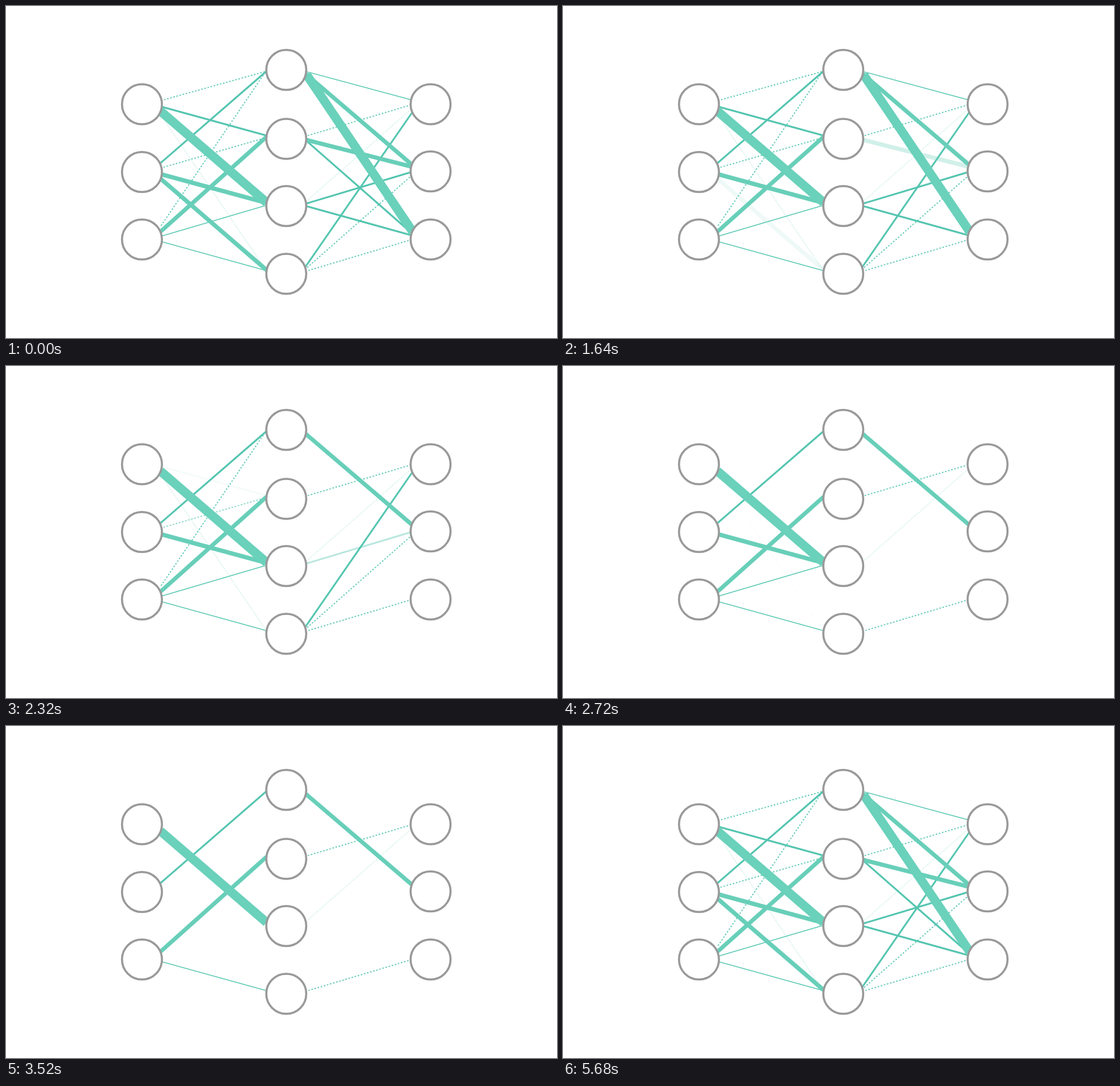
Write an HTML page that moves like this. It is 924x556 px and loops after 5720 ms.

```html
<!DOCTYPE html>
<html lang="en">
<head>
<meta charset="utf-8">
<title>Network pruning</title>
<style>
html, body { margin: 0; width: 100%; height: 100%; overflow: hidden; background: #fff; }
svg { display: block; width: 924px; height: 556px; }
circle { fill: #fff; stroke: #999; stroke-width: 3.5; }
.faint { stroke: #a5e3d5; stroke-width: 1; stroke-dasharray: 2 2; }
.dots { stroke: #5cc9b4; stroke-width: 1.8; stroke-dasharray: 2.6 2.8; }
.thin { stroke: #5cc9b4; stroke-width: 1.4; }
.mid { stroke: #54c5b0; stroke-width: 3; }
.bold { stroke: #68cfb9; stroke-width: 7; }
.heavy { stroke: #6ad1bb; stroke-width: 15; }
</style>
</head>
<body>
<svg id="stage" viewBox="0 0 924 556"></svg>
<script>
const LOOP = 5720, STEP = 40, FADE = 200;
const RETURN_START = 4800, RETURN_END = 5680;

// class, x1, y1, x2, y2, [fade start, fade length]; permanent links have no fade
const links = [
  ['faint', 262, 186, 435, 441, 2560],
  ['faint', 506, 325, 678, 174],
  ['dots', 265, 157, 434, 110, 1860],
  ['dots', 264, 270, 434, 221, 2270],
  ['dots', 260, 368, 434, 112, 2440],
  ['dots', 506, 217, 678, 166],
  ['dots', 505, 438, 679, 285, 2410],
  ['dots', 507, 443, 678, 392],
  ['thin', 262, 385, 436, 334, 3300],
  ['thin', 262, 395, 436, 443],
  ['thin', 504, 110, 679, 157, 2060],
  ['mid', 262, 169, 437, 217, 2130],
  ['mid', 258, 264, 437, 109],
  ['mid', 504, 226, 681, 381, 1440],
  ['mid', 503, 331, 680, 278, 2200],
  ['mid', 503, 335, 680, 384, 1700],
  ['mid', 502, 437, 682, 177, 2340],
  ['bold', 261, 282, 438, 330, 2800, 420],
  ['bold', 259, 289, 438, 443, 1460],
  ['bold', 259, 378, 437, 219],
  ['bold', 503, 114, 681, 266],
  ['bold', 503, 224, 680, 269, 1500],
  ['heavy', 259, 176, 437, 329],
  ['heavy', 504, 115, 682, 378, 1680]
];

const columns = [
  [228, [164.5, 278, 391]],
  [470, [107, 222.5, 335, 448.5]],
  [712, [164.5, 277, 391]]
];

const stage = document.getElementById('stage');

function add(tag, attrs) {
  const el = document.createElementNS('http://www.w3.org/2000/svg', tag);
  for (const key in attrs) el.setAttribute(key, attrs[key]);
  return stage.appendChild(el);
}

const fading = [];
for (const [kind, x1, y1, x2, y2, start, length = FADE] of links) {
  const el = add('line', { class: kind, x1, y1, x2, y2 });
  if (start) fading.push({ el, start, length });
}
for (const [cx, rows] of columns)
  for (const cy of rows) add('circle', { cx, cy, r: 33.5 });

const ramp = (t, start, length) => Math.min(1, Math.max(0, (t - start) / length));

function draw(now) {
  const t = Math.floor(now % LOOP / STEP) * STEP;
  const back = ramp(t, RETURN_START, RETURN_END - RETURN_START);
  for (const { el, start, length } of fading)
    el.style.opacity = Math.max(1 - ramp(t, start, length), back);
}

const begin = performance.now();
function tick() {
  draw(performance.now() - begin);
  requestAnimationFrame(tick);
}
tick();
</script>
</body>
</html>
```
